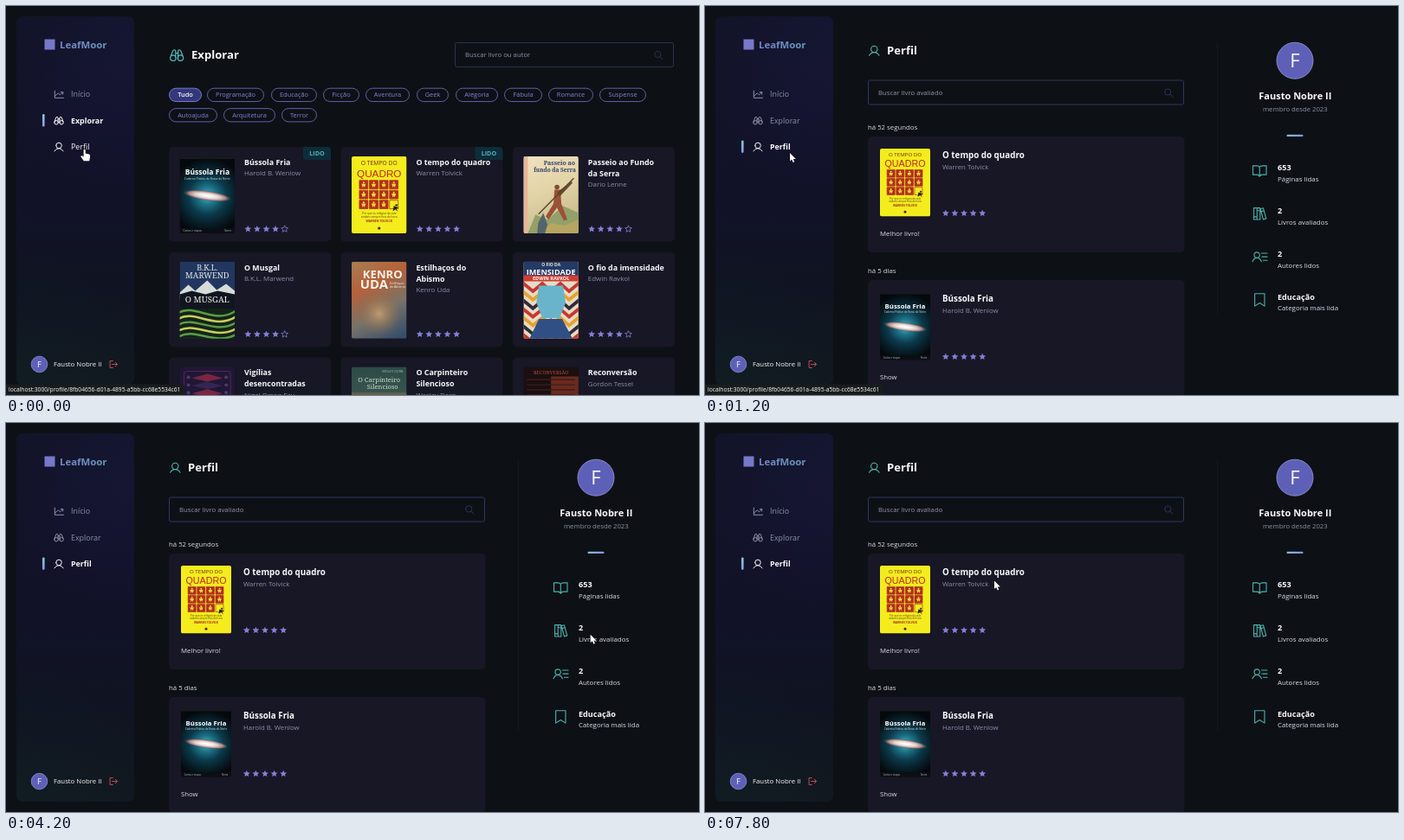
These frames come from a looping animation (800 by 450 pixels, 8 s). An HTML page with a canvas:

```html
<!DOCTYPE html>
<html lang="pt-BR">
<head>
<meta charset="utf-8">
<title>Perfil</title>
<style>
html, body { margin: 0; width: 100%; height: 100%; overflow: hidden; background: #0d1116; }
canvas { display: block; width: 100vw; height: 100vh; }
</style>
</head>
<body>
<canvas id="stage" width="800" height="450"></canvas>
<script>
const ctx = document.getElementById('stage').getContext('2d');
const LOOP = 8000, STEP = 200;
const WHITE = '#f8f9fc', LIGHT = '#d8dce8', GRAY = '#8b90a6', PURPLE = '#8381d9', TEAL = '#50b2c0', CARD = '#181725';
const SANS = '"Open Sans", "Noto Sans", sans-serif';
const SERIF = '"Noto Serif", serif';
const USER = 'Fausto Nobre II';

const ring = (x, y, r) => `M${x - r} ${y}a${r} ${r} 0 1 0 ${2 * r} 0a${r} ${r} 0 1 0 ${-2 * r} 0`;
const icons = {
  chart: 'M2 3V13.5H15M14 5L10 9L7 6.5L2 11M11 5H14V8',
  binoculars: ring(4.2, 11, 2.9) + ring(11.8, 11, 2.9) +
    'M1.5 10L4 3.4Q6 1.6 6.8 4V11M14.5 10L12 3.4Q10 1.6 9.2 4V11M6.8 6H9.2',
  user: ring(8, 6.2, 4.2) + 'M1.5 14.5Q4 10.4 8 10.4T14.5 14.5',
  search: ring(7, 7, 5) + 'M10.8 10.8L15 15',
  book: 'M8 4Q7 2.5 5 2.5H.5V12.5H5Q7 12.5 8 14.5Q9 12.5 11 12.5H15.5V2.5H11Q9 2.5 8 4V14.5',
  books: 'M1.5 1.5H5V14.5H1.5ZM5 1.5H8.5V14.5H5ZM5 4.5H8.5M1.5 11.5H5M8.8 2.6L12 1.6L15.2 13.4L12 14.4L8.8 2.6M9.7 5.4L12.9 4.5',
  authors: ring(5, 6, 3.1) + 'M0 13.5Q1.5 9.2 5 9.2T10 13.5M10 4H16.5M10.5 8H16.5M12 12H16.5',
  bookmark: 'M2.5 1H13.5V15L8 11.5L2.5 15Z',
  logout: 'M7 2H2V14H7M6 8H15M11.5 4.5L15 8L11.5 11.5'
};

function rect(x, y, w, h, fill, r = 0, stroke, lw = 1) {
  ctx.beginPath();
  ctx.roundRect(x, y, w, h, r);
  if (fill) { ctx.fillStyle = fill; ctx.fill(); }
  if (stroke) { ctx.strokeStyle = stroke; ctx.lineWidth = lw; ctx.stroke(); }
}

function disc(x, y, r, fill, stroke) {
  ctx.beginPath();
  ctx.arc(x, y, r, 0, 7);
  ctx.fillStyle = fill;
  ctx.fill();
  if (stroke) { ctx.strokeStyle = stroke; ctx.lineWidth = .8; ctx.stroke(); }
}

function text(str, x, y, size, fill, weight = 500, align = 'left', family = SANS) {
  ctx.font = `${weight} ${size}px ${family}`;
  ctx.textAlign = align;
  ctx.fillStyle = fill;
  ctx.fillText(str, x, y);
}

function poly(points, fill) {
  ctx.beginPath();
  for (let i = 0; i < points.length; i += 2) ctx.lineTo(points[i], points[i + 1]);
  ctx.closePath();
  ctx.fillStyle = fill;
  ctx.fill();
}

// Icons live on a 16-unit grid and are placed by their centre.
function icon(name, cx, cy, size, color, lw = 1) {
  const s = size / 16;
  ctx.save();
  ctx.translate(cx - size / 2, cy - size / 2);
  ctx.scale(s, s);
  ctx.strokeStyle = color;
  ctx.lineWidth = lw / s;
  ctx.lineJoin = ctx.lineCap = 'round';
  ctx.stroke(new Path2D(icons[name]));
  ctx.restore();
}

function blend(gradient, colors) {
  colors.forEach((c, i) => gradient.addColorStop(i / (colors.length - 1), c));
  return gradient;
}
const linear = (x0, y0, x1, y1, ...colors) => blend(ctx.createLinearGradient(x0, y0, x1, y1), colors);
const radial = (x, y, r, ...colors) => blend(ctx.createRadialGradient(x, y, 0, x, y, r), colors);

function stars(x, y, count) {
  for (let i = 0; i < 5; i++) {
    ctx.beginPath();
    for (let k = 0; k < 10; k++) {
      const r = k % 2 ? 1.9 : 4.1, a = k * Math.PI / 5 - Math.PI / 2;
      ctx.lineTo(x + i * 10.6 + r * Math.cos(a), y + r * Math.sin(a));
    }
    ctx.closePath();
    ctx.fillStyle = ctx.strokeStyle = PURPLE;
    ctx.lineWidth = .8;
    ctx.lineJoin = 'round';
    if (i < count) ctx.fill(); else ctx.stroke();
  }
}

// Covers are drawn on a 64 x 90 grid.
const covers = {
  galaxy() {
    rect(0, 0, 64, 90, '#06090d');
    rect(0, 3, 64, 81, radial(32, 46, 44, '#4fb4c4', '#1b7086', '#0b3a4a', '#07202a', '#05090d'));
    ctx.save();
    ctx.translate(32, 46);
    ctx.rotate(.14);
    ctx.scale(1, .21);
    disc(0, 0, 29, radial(0, 0, 29, '#ffffff', '#f7f1ee', '#dcd0cd', '#a98280', 'rgba(60,50,60,0)'));
    ctx.restore();
    rect(0, 0, 64, 3, '#161b20');
    text('Bússola Fria', 32, 21.3, 8.6, '#fff', 700, 'center');
    text('Caderno Prático de Rotas do Norte', 32, 27, 3.3, '#d4e4e8', 400, 'center');
    rect(0, 84, 64, 6, '#0b0f13');
    text('Cartas e mapas', 4, 88, 3, '#a9b8bb');
    text('Norte', 60, 88, 3, '#a9b8bb', 400, 'right');
  },
  yellow() {
    rect(0, 0, 64, 90, '#f4ec1d');
    text('O TEMPO DO', 32, 10.5, 6.8, '#6d2c20', 500, 'center');
    text('QUADRO', 32, 24.5, 11.8, '#b92a20', 500, 'center', '"Liberation Sans", sans-serif');
    for (let i = 0; i < 12; i++) {
      const x = 9 + i % 4 * 11.7, y = 28 + Math.floor(i / 4) * 11.6;
      rect(x, y, 10, 10, i === 11 ? '#f4ec1d' : '#b52b23', 0, '#a82a22', .7);
      if (i === 11) continue;
      disc(x + 5, y + 2.7, 1.1, '#f4dc32');
      poly([x + 2.4, y + 4, x + 7.5, y + 4, x + 6.1, y + 8.5, x + 5, y + 6.4, x + 3.9, y + 8.5], '#f4dc32');
    }
    disc(52, 57, 1.2, '#25211a');
    poly([49, 58, 55, 60, 52, 61, 54, 65, 51, 62, 48, 64], '#25211a');
    text('Por que os relógios da sala', 32, 68, 3.2, '#5a421c', 400, 'center');
    text('andam sempre fora de hora', 32, 71.5, 3.2, '#5a421c', 400, 'center');
    text('WARREN TOLVICK', 32, 77, 3.5, '#a23120', 700, 'center');
    disc(32, 84, 1.6, '#3b2c16');
  },
  journey() {
    rect(0, 0, 64, 90, linear(0, 0, 40, 90, '#efe2be', '#e2d2a6', '#c3b988'));
    rect(0, 0, 5, 90, '#e3b79a');
    poly([5, 90, 14, 68, 28, 74, 46, 58, 64, 66, 64, 90], '#93a06a');
    poly([18, 90, 32, 78, 48, 81, 64, 74, 64, 90], '#b7a661');
    text('Passeio ao', 60, 10, 7, '#34416a', 700, 'right', SERIF);
    text('fundo da Serra', 61, 18.5, 6.5, '#34416a', 700, 'right', SERIF);
    disc(39, 36, 2.8, '#804a32');
    poly([36, 39, 43, 39, 44, 55, 51, 74, 47, 75, 39, 60, 29, 74, 26, 70, 35, 55], '#9a5138');
    poly([39, 42, 56, 29, 57, 31, 42, 47], '#6d4930');
    poly([17, 67, 58, 25, 59, 26, 18, 68], '#5b442e');
    poly([17, 78, 23, 66, 28, 80, 25, 90, 16, 90], '#55646a');
  },
  hills() {
    rect(0, 0, 64, 90, '#22375f');
    poly([0, 36, 10, 27, 18, 34, 32, 22, 43, 33, 54, 26, 64, 34, 64, 44, 0, 44], '#d5dcd9');
    poly([0, 38, 14, 34, 30, 38, 44, 34, 64, 38, 64, 58, 0, 58], '#10151f');
    rect(0, 55, 64, 35, '#14231a');
    for (let i = 0; i < 5; i++) {
      ctx.beginPath();
      ctx.moveTo(-2, 60 + i * 7);
      ctx.bezierCurveTo(18, 48 + i * 7, 40, 75 + i * 6, 66, 57 + i * 7);
      ctx.strokeStyle = i % 2 ? '#c5cf58' : '#5a9d45';
      ctx.lineWidth = 2.5;
      ctx.stroke();
    }
    text('B.K.L.', 32, 10, 9, '#e6e9e7', 400, 'center', SERIF);
    text('MARWEND', 32, 19.5, 9.4, '#e6e9e7', 400, 'center', SERIF);
    text('O MUSGAL', 32, 48, 9.8, '#f5f4e9', 400, 'center', SERIF);
  },
  swirl() {
    rect(0, 0, 64, 90, linear(0, 0, 50, 90, '#a87d52', '#b5613a', '#777369', '#384f6b'));
    rect(7, 30, 48, 60, radial(32, 61, 26, '#bd9a70', 'rgba(150,105,70,0)'));
    text('KENRO', 36, 19, 13.2, '#f7f2e8', 700, 'center');
    text('UDA', 26, 32, 15, '#f7f2e8', 700, 'center');
    text('Estilhaços', 44, 26, 3.7, '#f7f2e8');
    text('do Abismo', 44, 31, 3.7, '#f7f2e8');
  },
  zigzag() {
    rect(0, 0, 64, 90, '#e5dcc8');
    for (let i = 0; i < 7; i++) {
      const y = 23 + i * 10;
      poly([0, y, 11, y + 9, 22, y, 32, y + 9, 43, y, 53, y + 9, 64, y,
        64, y + 5, 53, y + 14, 43, y + 5, 32, y + 14, 22, y + 5, 11, y + 14, 0, y + 5],
        ['#c8382c', '#e4a32e', '#342b36'][i % 3]);
    }
    poly([18, 28, 46, 28, 49, 48, 42, 66, 22, 66, 15, 48], '#69b4cb');
    poly([7, 90, 18, 67, 45, 67, 57, 90], '#304f84');
    rect(0, 0, 64, 20, '#253b67');
    text('O FIO DA', 32, 5, 5, '#efe7ce', 700, 'center');
    text('IMENSIDADE', 32, 15, 9.2, '#fff', 700, 'center');
    rect(0, 16, 64, 7, '#cf3d32');
    text('EDWIN RAVKOL', 32, 21.5, 5.6, '#fff', 700, 'center');
  },
  night() {
    rect(0, 0, 64, 90, '#201737');
    rect(5, 5, 54, 80, null, 3, '#642640', 1);
    for (let i = 0; i < 5; i++) {
      const y = 8 + i * 9;
      poly([32, y, 50, y + 5, 32, y + 9, 14, y + 5], i % 2 ? '#342554' : '#7b2542');
      disc(10, y + 4, 2, '#4b3b70');
      disc(54, y + 4, 2, '#4b3b70');
    }
  },
  craft() {
    rect(0, 0, 64, 90, linear(0, 0, 0, 60, '#2d4b47', '#405e52'));
    text('WESLEY DORN', 60, 6, 3.6, '#9fb8ac', 400, 'right');
    text('O Carpinteiro', 32, 18, 7.6, '#d0dbcf', 400, 'center', SERIF);
    text('Silencioso', 36, 26, 7.6, '#d0dbcf', 400, 'center', SERIF);
    rect(0, 30, 64, 60, '#62604f');
  },
  ember() {
    rect(0, 0, 64, 90, '#1b0f10');
    rect(32, 11, 32, 79, '#6b2a1e');
    text('RECONVERSÃO', 32, 8, 5.6, '#b54f38', 400, 'center', SERIF);
    for (let i = 0; i < 5; i++) rect(4, 14 + i * 6, 56, 1.5, '#3a1c1b');
  }
};

function cover(name, x, y, w, h) {
  ctx.save();
  ctx.beginPath();
  ctx.roundRect(x, y, w, h, 2);
  ctx.clip();
  ctx.translate(x, y);
  ctx.scale(w / 64, h / 90);
  covers[name]();
  ctx.restore();
}

const chips = [
  ['Tudo', 188, 38], ['Programação', 232, 66], ['Educação', 306, 53], ['Ficção', 366, 42],
  ['Aventura', 415, 51], ['Geek', 474, 37], ['Alegoria', 519, 49], ['Fábula', 575, 44],
  ['Romance', 626, 52], ['Suspense', 685, 54],
  ['Autoajuda', 188, 56, 1], ['Arquitetura', 251, 60, 1], ['Terror', 318, 41, 1]
];

const books = [
  ['galaxy', ['Bússola Fria'], 'Harold B. Wenlow', 4, true],
  ['yellow', ['O tempo do quadro'], 'Warren Tolvick', 5, true],
  ['journey', ['Passeio ao Fundo', 'da Serra'], 'Dario Lenne', 4],
  ['hills', ['O Musgal'], 'B.K.L. Marwend', 4],
  ['swirl', ['Estilhaços do', 'Abismo'], 'Kenro Uda', 5],
  ['zigzag', ['O fio da imensidade'], 'Edwin Ravkol', 4],
  ['night', ['Vigílias', 'desencontradas'], 'Nigel Orson Fay', 4],
  ['craft', ['O Carpinteiro', 'Silencioso'], 'Wesley Dorn', 4],
  ['ember', ['Reconversão'], 'Gordon Tessel', 4]
];

const stats = [
  ['book', '653', 'Páginas lidas'], ['books', '2', 'Livros avaliados'],
  ['authors', '2', 'Autores lidos'], ['bookmark', 'Educação', 'Categoria mais lida']
];

function searchBox(x, y, w, hint, border) {
  rect(x + .5, y + .5, w - 1, 28, null, 2, border);
  text(hint, x + 12, y + 17.3, 7.75, '#8f93a8');
  icon('search', x + w - 18, y + 14.7, 11.5, border, .9);
}

function sidebar(active, hover) {
  rect(12, 12, 136, 426, linear(0, 12, 0, 438, '#121428', '#121329', '#111228', '#101421', '#11191f'), 7);
  rect(12, 12, 136, 426, radial(148, 70, 150, 'rgba(40,34,112,.15)', 'rgba(40,34,112,0)'), 7);
  rect(12, 12, 136, 426, radial(12, 430, 150, 'rgba(15,52,58,.12)', 'rgba(15,52,58,0)'), 7);
  rect(44.5, 38.5, 12, 12, '#7778c9');
  text('LeafMoor', 62, 48.8, 11.4, linear(62, 0, 117, 0, '#7783c9', '#629ab8'), 700);

  [['chart', 'Início'], ['binoculars', 'Explorar'], ['user', 'Perfil']].forEach(([name, label], i) => {
    const y = 102 + i * 30.4, on = i === active;
    const color = on || i === hover ? WHITE : GRAY;
    if (on) rect(42, y - 7.4, 2.6, 14.5, linear(0, y - 7, 0, y + 7, '#7fd1cc', '#9694f5'), 1.3);
    icon(name, 61, y, 12.5, color);
    text(label, 75, y + 3.2, 8.9, color, on ? 700 : 500);
  });

  disc(38.5, 414.5, 9.3, '#5e60b8', '#8f91d8');
  text('F', 38.5, 418, 9.5, WHITE, 500, 'center');
  text(USER, 55, 417.4, 7.8, WHITE);
  icon('logout', 124, 414.5, 10.5, '#c04b5b');
}

function explore() {
  icon('binoculars', 197.2, 56.8, 18, '#55bcc0', 1.2);
  text('Explorar', 214, 61.3, 13.1, WHITE, 700);
  searchBox(518, 42, 253, 'Buscar livro ou autor', '#2b3352');

  chips.forEach(([label, x, w, row = 0], i) => {
    const y = 94.7 + row * 23.4;
    rect(x + .5, y + .5, w - 1, 15.3, i ? null : '#33387a', 8, i ? '#5f5da8' : '#7877cc');
    text(label, x + w / 2, y + 10.7, 7.45, i ? PURPLE : WHITE, i ? 500 : 600, 'center');
  });

  books.forEach(([art, title, author, rating, read], i) => {
    const x = 188 + i % 3 * 198.4, y = 163 + Math.floor(i / 3) * 121.8;
    rect(x, y, 187, 109.5, CARD, 5);
    cover(art, x + 12.6, y + 11, 63.5, 89);
    title.forEach((line, k) => text(line, x + 87, y + 20.8 + k * 13, 8.9, WHITE, 700));
    text(author, x + 87, y + 20.4 + title.length * 13, 7.9, GRAY);
    stars(x + 91.3, y + 95, rating);
    if (read) {
      rect(x + 155, y, 32, 15, '#0d2d38', [0, 4, 0, 3]);
      text('LIDO', x + 171, y + 10, 7.2, TEAL, 700, 'center');
    }
  });
}

function review(y, when, art, title, author, comment) {
  text(when, 188, y - 8.4, 7.8, LIGHT);
  rect(188, y, 365.5, 134, CARD, 5);
  cover(art, 202, y + 14, 58, 78.5);
  text(title, 274, y + 24.8, 9.8, WHITE, 700);
  text(author, 274, y + 37.6, 7.85, GRAY);
  stars(277.8, y + 88.8, 5);
  text(comment, 202, y + 115.3, 7.8, LIGHT);
}

function profile() {
  icon('user', 195.3, 51.5, 14, '#50b9b4', 1.1);
  text('Perfil', 210, 56.2, 13.1, WHITE, 700);
  searchBox(188, 85.5, 365, 'Buscar livro avaliado', '#2f3560');
  review(151, 'há 52 segundos', 'yellow', 'O tempo do quadro', 'Warren Tolvick', 'Melhor livro!');
  review(317, 'há 5 dias', 'galaxy', 'Bússola Fria', 'Harold B. Wenlow', 'Show');

  rect(591, 42, 1, 314, '#141820');
  disc(681, 63.2, 21, '#5e60b8', '#9b9de0');
  text('F', 681, 71, 22, WHITE, 500, 'center');
  text(USER, 681.3, 108, 11, WHITE, 700, 'center');
  text('membro desde 2023', 681.3, 121.5, 7.75, GRAY, 500, 'center');
  rect(671.5, 148.7, 19, 2.4, linear(671, 0, 691, 0, '#7fbdd5', '#8b91df'), 1.2);
  stats.forEach(([name, value, label], i) => {
    const y = 190.2 + i * 49.8;
    icon(name, 640.3, y + .3, 16.5, '#4fb0ae', 1.1);
    text(value, 661, y, 9.1, WHITE, 700);
    text(label, 661, y + 12.7, 7.9, LIGHT);
  });
}

function statusBar() {
  rect(0, 437.5, 206, 13, '#1a1b1d', [0, 3, 0, 0]);
  text('localhost:3000/profile/8fb04656-d01a-4895-a5bb-cc68e5534c61', 3, 446.3, 6.7, '#fff');
}

const pointers = {
  hand: 'M-1 1Q0-.7 1.1 1V5L5.4 6Q6.8 6.5 6.5 8.5L5.7 13.8H-.8L-4.2 9Q-4.4 7.3-2.6 7.8L-1 9Z',
  arrow: 'M0 0V9.6L2.2 7.6L3.7 11L5.3 10.3L3.8 7H6.9Z',
  beam: 'M-1.8-4.8Q0-4.8 0-3.8Q0-4.8 1.8-4.8M0-3.8V3.8M-1.8 4.8Q0 4.8 0 3.8Q0 4.8 1.8 4.8'
};

// time, x, y, pointer shape
const route = [
  [0, 90.6, 165.5, 'hand'], [1000, 90.6, 165.5, 'hand'], [1200, 98, 170, 'arrow'],
  [1400, 190, 190, 'arrow'], [1800, 610, 252, 'arrow'], [2000, 661.5, 258.5, 'arrow'],
  [2400, 698, 297, 'beam'], [3200, 669, 299, 'beam'], [3600, 669, 299, 'beam'],
  [3800, 670, 290, 'arrow'], [4400, 677, 222, 'arrow'], [4800, 677, 222, 'arrow'],
  [5200, 678, 200, 'beam'], [5400, 678, 196.5, 'beam'], [6000, 655, 192, 'arrow'],
  [7200, 400, 186, 'arrow'], [7600, 334, 182.5, 'arrow'], [8000, 334, 182.5, 'arrow']
];

function pointer(t) {
  let i = 0;
  while (i < route.length - 2 && route[i + 1][0] <= t) i++;
  const [t0, x0, y0, shape] = route[i], [t1, x1, y1] = route[i + 1];
  const k = (t - t0) / (t1 - t0);
  const path = new Path2D(pointers[shape]);
  ctx.save();
  ctx.translate(x0 + (x1 - x0) * k, y0 + (y1 - y0) * k);
  ctx.lineJoin = 'round';
  if (shape === 'beam') {
    ctx.strokeStyle = '#090b0e';
    ctx.lineWidth = 2;
    ctx.stroke(path);
    ctx.strokeStyle = '#e8e9ec';
    ctx.lineWidth = .9;
    ctx.stroke(path);
  } else {
    ctx.fillStyle = '#fff';
    ctx.strokeStyle = '#080a0d';
    ctx.lineWidth = 1;
    ctx.stroke(path);
    ctx.fill(path);
  }
  ctx.restore();
}

function draw(now) {
  const t = Math.floor(now % LOOP / STEP) * STEP;
  rect(0, 0, 800, 450, '#0d1115');
  const start = t < 200;
  sidebar(start ? 1 : 2, start ? 2 : -1);
  if (start) explore();
  else if (t < 600) text('Carregando...', 188, 56.2, 13, WHITE, 700);
  else profile();
  if (t < 1600) statusBar();
  pointer(t);
}

const begin = performance.now();
function loop() {
  draw(performance.now() - begin);
  requestAnimationFrame(loop);
}
loop();
</script>
</body>
</html>
```
